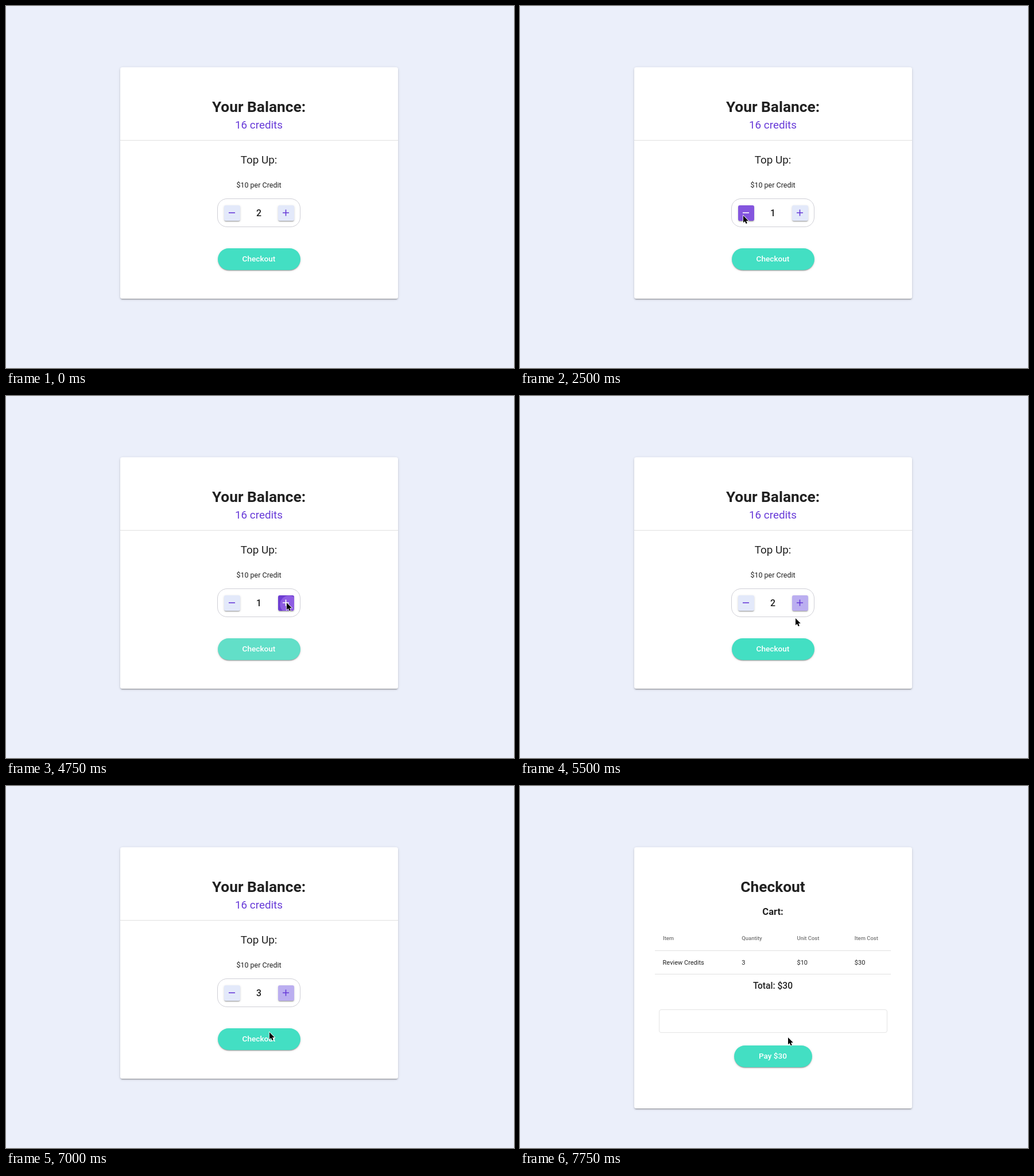
Animation, 885 px wide and 632 px high, one loop 8000 ms. Source, as an HTML page:

```html
<!DOCTYPE html>
<html lang="en">
<head>
<meta charset="utf-8">
<title>Credit top-up</title>
<style>
  html, body { margin: 0; width: 100%; height: 100%; overflow: hidden; background: #ebeffa; }
  #stage { position: relative; width: 885px; height: 632px; overflow: hidden; background: #ebeffa; font-family: Roboto, sans-serif; }
  #stage div, svg { position: absolute; box-sizing: border-box; }
  svg { left: 0; top: 0; }
  .raised { box-shadow: 0 3px 1px -2px rgba(0,0,0,.2), 0 2px 2px rgba(0,0,0,.14), 0 1px 5px rgba(0,0,0,.12); }
  .button { box-shadow: 0 2px 1px -1px rgba(0,0,0,.2), 0 1.5px 1.5px rgba(0,0,0,.14), 0 1px 4px rgba(0,0,0,.12); }
  #card { left: 198.5px; top: 106.5px; width: 484.5px; background: #fff; border-radius: 3.5px; }
  .rule { height: 1px; background: #e0e0e0; }
  #stepper { left: 368px; top: 336px; width: 145px; height: 50px; border: 1px solid #cfcfd6; border-radius: 17px; }
  .square { top: 347.5px; width: 27.5px; height: 27.5px; border-radius: 3px; }
  .pill { border-radius: 20px; background: #43dfc3; }
  #field { left: 242px; top: 390px; width: 397.5px; height: 41px; border: 1px solid #e4e4e4; border-radius: 4px; }
  text { fill: #212121; }
  .mid text, text.mid { text-anchor: middle; }
  .bold { font-weight: 700; }
  .medium { font-weight: 500; }
  .head text { fill: #757575; font-size: 9.45px; font-weight: 500; }
  .row text { font-size: 11px; }
  .icon { fill: none; stroke-width: 1.6; }
  [hidden] { display: none; }
</style>
</head>
<body>
<div id="stage">
  <div id="card" class="raised"></div>

  <section id="topup">
    <div class="rule" style="left:198.5px;top:234px;width:484.5px"></div>
    <div id="stepper"></div>
    <div id="minus" class="square" style="left:380px"></div>
    <div id="plus" class="square" style="left:474px"></div>
    <div id="checkout" class="pill" style="left:368.5px;top:422.5px;width:144.5px;height:38px"></div>
    <svg class="mid" width="885" height="632">
      <text class="bold" x="440.5" y="185.3" font-size="26.3">Your Balance:</text>
      <text x="440.5" y="213.8" font-size="18.85" style="fill:#673ad8">16 credits</text>
      <text x="440.5" y="275.3" font-size="18.85">Top Up:</text>
      <text x="440.5" y="316.6" font-size="12.5">$10 per Credit</text>
      <text id="count" class="medium" x="440.5" y="366.6" font-size="15.8"></text>
      <text id="label" class="medium" x="440.5" y="446.2" font-size="13.6">Checkout</text>
      <path id="minusIcon" class="icon" d="M388 361h11"/>
      <path id="plusIcon" class="icon" d="M482 361h11M487.5 355.5v11"/>
    </svg>
  </section>

  <section id="payment" hidden>
    <div class="rule" style="left:235px;top:287px;width:411px"></div>
    <div class="rule" style="left:235px;top:328px;width:411px"></div>
    <div id="field"></div>
    <div class="pill button" style="left:373px;top:452.5px;width:135.5px;height:38.5px"></div>
    <svg width="885" height="632">
      <text class="mid bold" x="440.5" y="185.3" font-size="26.3">Checkout</text>
      <text class="mid bold" x="440.5" y="225.3" font-size="16.5">Cart:</text>
      <g class="head">
        <text x="249" y="269.4">Item</text><text x="386.3" y="269.4">Quantity</text>
        <text x="482.5" y="269.4">Unit Cost</text><text x="582.8" y="269.4">Item Cost</text>
      </g>
      <g class="row">
        <text x="248.6" y="311.8">Review Credits</text><text x="386.3" y="311.8">3</text>
        <text x="482.5" y="311.8">$10</text><text x="582.8" y="311.8">$30</text>
      </g>
      <text class="mid medium" x="440.5" y="354" font-size="15.6">Total: $30</text>
      <text class="mid medium" x="440.5" y="476.3" font-size="13.6" style="fill:#fff">Pay $30</text>
    </svg>
  </section>

  <svg width="885" height="632">
    <path id="cursor" d="M0 0V12.3L2.8 9.7L4.7 14.1L6.8 13.2L5 8.9H8.8Z"
      fill="#000" stroke="#fff" stroke-width="1.4" paint-order="stroke"/>
  </svg>
</div>

<script>
const LOOP = 8000, STEP = 250;
const $ = id => document.getElementById(id);

// One letter per step: normal, mid hover, hover, ripple, partial ripple, greying, disabled, lightening
const tracks = {
  count:    "2".repeat(9) + "111" + "0".repeat(7) + "11" + "22222" + "333333",
  minus:    "n".repeat(7) + "mhrrh" + "g" + "dddddd" + "n".repeat(13),
  plus:     "n".repeat(17) + "mhphrm" + "nn" + "mrhm" + "nnn",
  checkout: "n".repeat(12) + "g" + "dddddd" + "l" + "nnn" + "hh" + "nnnn" + "hhn"
};

// state: [background, foreground]
const squareLook = {
  n: ["#e3e9fa", "#673ad8"],
  m: ["#bbaef0", "#673ad8"],
  h: ["#6d3dd1", "#fff"],
  r: ["#8455de", "#fff"],
  p: ["radial-gradient(circle at 19px 16px, #8e5de3 15px, #6d3dd1 16px)", "#fff"],
  g: ["#cfc8de", "#a6a6a6"],
  d: ["#e0e0e0", "#a6a6a6"]
};
const pillLook = {
  n: ["#43dfc3", "#fff"],
  h: ["#2e9b87", "#fff"],
  l: ["#62dfc8", "#fff"],
  g: ["#a0e0d4", "#d0d0d0"],
  d: ["#e0e0e0", "#a0a0a0"]
};

// Pointer tip per step, starting when it enters
const ENTER = 2;
const path = [
  [602, 184], [568, 252], [508, 332], [440, 381], [391, 370],
  [390, 368], [389, 367], [389, 366], [389, 366], [389, 367],
  [389, 367], [389, 367], [389, 367], [389, 367],
  [437, 370], [480, 363], [488, 361], [489, 361], [489, 361],
  [489, 362], [480, 388], [456, 448], [471, 397], [486, 364],
  [488, 362], [487, 365], [459, 430], [459, 433], [461, 436], [467, 439]
];

function paint(box, ink, prop, [back, fore], state) {
  box.style.background = back;
  box.classList.toggle("button", state !== "d" && state !== "g");
  ink.style[prop] = fore;
}

function draw(step) {
  const paying = step === LOOP / STEP - 1;
  $("topup").hidden = paying;
  $("payment").hidden = !paying;
  $("card").style.height = (paying ? 456 : 404.5) + "px";

  $("count").textContent = tracks.count[step];
  for (const id of ["minus", "plus"]) {
    const state = tracks[id][step];
    paint($(id), $(id + "Icon"), "stroke", squareLook[state], state);
  }
  const state = tracks.checkout[step];
  paint($("checkout"), $("label"), "fill", pillLook[state], state);

  const tip = path[step - ENTER];
  $("cursor").style.display = tip ? "" : "none";
  if (tip) $("cursor").setAttribute("transform", `translate(${tip})`);
}

const start = performance.now();
let shown = -1;
function tick() {
  const step = Math.floor((performance.now() - start) % LOOP / STEP);
  if (step !== shown) draw(shown = step);
  requestAnimationFrame(tick);
}
tick();
</script>
</body>
</html>
```
